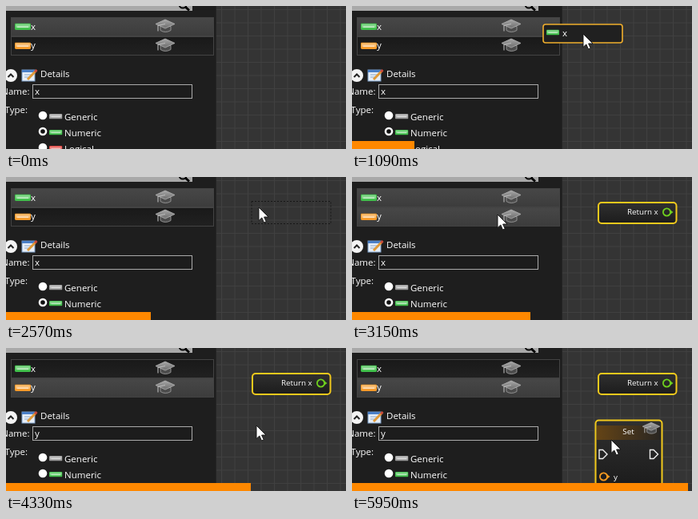
Recreate the animation shown at these times as an HTML page. Size 425 by 179 pixels, loop 6030 ms.

```html
<!DOCTYPE html>
<html lang="en">
<head>
<meta charset="utf-8">
<title>Variable drag and drop</title>
<style>
  html, body { margin: 0; height: 100%; overflow: hidden; background: #1e1e1e; }
  svg { display: block; width: 425px; height: 179px; }
  text { font: 11.5px "Open Sans", "Noto Sans", sans-serif; fill: #fff; }
  .small { font-size: 9.8px; }
  .mid { text-anchor: middle; }
  .row { fill: url(#dark); stroke: #434343; }
  .row.on { fill: url(#lit); }
  .row.focus { fill: url(#plum); stroke: #dcb51e; }
  .node { fill: url(#body); stroke: #f2c91c; stroke-width: 2; }
</style>
</head>
<body>
<svg viewBox="0 0 425 179">
  <defs>
    <linearGradient id="dark" x2="0" y2="1"><stop stop-color="#191919"/><stop offset="1" stop-color="#212121"/></linearGradient>
    <linearGradient id="lit" x2="0" y2="1"><stop stop-color="#474747"/><stop offset="1" stop-color="#3c3c3c"/></linearGradient>
    <linearGradient id="plum" x2="0" y2="1"><stop stop-color="#17151b"/><stop offset="1" stop-color="#2c2735"/></linearGradient>
    <linearGradient id="body" x2="0" y2="1"><stop stop-color="#303030"/><stop offset="1" stop-color="#1c1c1c"/></linearGradient>
    <linearGradient id="teal"><stop stop-color="#17636c"/><stop offset=".5" stop-color="#1a5058"/><stop offset="1" stop-color="#242729"/></linearGradient>
    <linearGradient id="brown"><stop stop-color="#644416"/><stop offset="1" stop-color="#282522"/></linearGradient>
    <linearGradient id="metal" x2="0" y2="1"><stop stop-color="#a8a8a8"/><stop offset="1" stop-color="#6c6c6c"/></linearGradient>
    <pattern id="grid" x="269" y="4" width="16.5" height="16.5" patternUnits="userSpaceOnUse">
      <path d="M.5 0V16.5M0 .5H16.5" stroke="#404040"/>
    </pattern>
    <symbol id="pill" viewBox="0 0 20 9" preserveAspectRatio="none">
      <rect width="20" height="9" rx="1.5" fill="currentColor"/>
      <rect x="1" y="1" width="18" height="5" rx="1" fill="#fff" opacity=".35"/>
      <path d="M3 5H17" stroke="#fff" stroke-width="1.6" opacity=".55"/>
    </symbol>
    <g id="cap">
      <path d="M-6 1V6Q0 10 7 6V1Z" fill="#4c4c4c" stroke="#999" stroke-width=".9"/>
      <path d="M-12-2 0-7.500 12-2 0 3.500Z" fill="url(#metal)" stroke="#b4b4b4" stroke-width=".8"/>
      <path d="M0-2-9 0V7" fill="none" stroke="#bbb" stroke-width="1.1"/>
    </g>
    <g id="pin" fill="none" stroke="currentColor" stroke-width="1.8">
      <circle r="4.6"/><path d="M4-3 8 0 4 3Z" fill="currentColor" stroke="none"/>
    </g>
    <path id="exec" d="M-4.5-5.5H0L5.5 0 0 5.5H-4.5Z" fill="none" stroke="#eee" stroke-width="1.4"/>
  </defs>

  <rect x="262" width="163" height="179" fill="#343434"/>
  <rect x="263" width="162" height="179" fill="url(#grid)"/>
  <path d="M262.5 0V179" stroke="#252525"/>

  <rect x="-2" y="-9.5" width="234.5" height="15" fill="#a9a9a9" stroke="#a9a9a9"/>
  <g fill="none" stroke="#050505" stroke-width="2"><circle cx="221" cy="-2" r="4.5"/><path d="M224 1 229 5.5" stroke-width="3"/></g>

  <rect id="rowX" class="row" x="6.5" y="14.5" width="253" height="23"/>
  <rect id="rowY" class="row" x="6.5" y="38.5" width="253" height="23"/>
  <use href="#pill" x="11" y="21.5" width="20" height="8.500" color="#3fbf4a"/>
  <use href="#pill" x="11" y="45.5" width="20" height="8.500" color="#f79a28"/>
  <text x="31" y="29.500">x</text>
  <text x="31" y="53">y</text>
  <use href="#cap" x="199" y="24.500"/>
  <use href="#cap" x="199" y="48.500"/>

  <circle cx="6" cy="87" r="8" fill="#f4f4f4"/>
  <path d="M2.5 89 6 85.5 9.5 89" fill="none" stroke="#222" stroke-width="2"/>
  <rect x="20" y="80" width="16" height="14" fill="#e6eef8" stroke="#7b9cc4"/>
  <path d="M20 81.5H36" stroke="#4a80c8" stroke-width="3"/>
  <path d="M23 86H32M23 89H30" stroke="#8fa9c8"/>
  <path d="M27 92 37.500 81" stroke="#e09a38" stroke-width="3"/>
  <path d="M36 82.500 38.500 80" stroke="#c94b3c" stroke-width="3"/>
  <text x="43" y="89">Details</text>
  <text x="29.500" y="111" text-anchor="end">Name:</text>
  <rect x="33.5" y="98.500" width="199" height="17" fill="#1c1c1c" stroke="#aaa"/>
  <text id="name" x="36" y="111">x</text>
  <text x="-1.500" y="134">Type:</text>
  <g id="types"></g>

  <rect id="trace" x="307" y="30.500" width="99" height="28" fill="none" stroke="#161616" stroke-dasharray="2 2"/>
  <g id="getNode">
    <rect class="node" x="308" y="32" width="97.500" height="26" rx="4"/>
    <text class="small" x="344" y="47">Return x</text>
    <use href="#pin" x="393.500" y="44" color="#6fd01e"/>
  </g>
  <g id="setNode">
    <rect class="node" x="304.500" y="90.500" width="83" height="82" rx="4"/>
    <rect x="306" y="97" width="80" height="18" fill="url(#brown)"/>
    <text class="small mid" x="345.500" y="108">Set</text>
    <use href="#cap" transform="translate(374 100) scale(.9)"/>
    <use href="#exec" x="313.500" y="133"/>
    <use href="#exec" x="377" y="133"/>
    <use href="#pin" x="314.500" y="161" color="#f59a20"/>
    <text class="small" x="327" y="165">y</text>
  </g>

  <g id="menu">
    <rect x=".5" y=".7" width="70.500" height="36" rx="4" fill="#262626" stroke="#f3e4cc" stroke-width="1.5"/>
    <rect id="pick" x="2" y="3" width="67.500" height="15" fill="url(#teal)"/>
    <text class="small mid" x="35.500" y="15">Get</text>
    <text class="small mid" x="35.500" y="31">Set</text>
  </g>
  <g id="ghost">
    <rect x="-50" y="-12" width="99" height="23" rx="3" fill="#202020" stroke="#f0ae2c" stroke-width="1.600"/>
    <use id="ghostPill" href="#pill" x="-46" y="-5.500" width="16" height="7"/>
    <text id="ghostName" x="-26" y="3"></text>
  </g>

  <rect id="bar" y="169" height="10" fill="#ff8800"/>
  <path id="cursor" d="M0 0V16.500L3.800 13 6.500 19 9.200 17.800 6.600 12H12Z" fill="#fff" stroke="#111" stroke-width=".9"/>
</svg>
<script>
const LOOP = 6030, STEP = 73.3, STEPS = 82;
const $ = id => document.getElementById(id);
const show = (id, on) => $(id).setAttribute("visibility", on ? "visible" : "hidden");
const place = (id, x, y) => $(id).setAttribute("transform", `translate(${x} ${y})`);

$("types").innerHTML = [["Generic", "#999"], ["Numeric", "#3fbf4a"], ["Logical", "#e03a34"]].map(([label, color], i) => `
  <g transform="translate(0 ${i * 20})">
    <circle cx="46" cy="137" r="5.300" fill="#fff"/>
    ${i === 1 ? '<circle id="dot" cx="46" cy="137" r="2.800" fill="#111"/>' : ""}
    <use href="#pill" x="54" y="135" width="16.500" height="6.500" color="${color}"/>
    <text x="73" y="143">${label}</text>
  </g>`).join("");

// Pointer stops: time, x, y
const path = [
  [30, 196, 190], [450, 161, 32], [560, 161, 32], [660, 163, 27], [800, 163, 27],
  [1230, 324, 37], [1390, 316, 38], [2700, 316, 38], [3240, 172, 48], [3480, 172, 48],
  [3670, 178, 71], [4040, 313, 97], [4700, 313, 97], [5000, 324, 115], [LOOP, 324, 115]
];

function pointerAt(t) {
  const i = Math.max(1, path.findIndex(p => p[0] >= t));
  const [t0, x0, y0] = path[i - 1], [t1, x1, y1] = path[i];
  const u = Math.min(1, Math.max(0, (t - t0) / (t1 - t0))), e = u * u * (3 - 2 * u);
  return [x0 + (x1 - x0) * e, y0 + (y1 - y0) * e].map(Math.round);
}

function draw(time) {
  const step = Math.min(STEPS - 1, Math.floor((time + 30) / STEP));
  const t = step * STEP;
  const within = (a, b = LOOP) => t >= a && t < b;
  const [x, y] = pointerAt(t);
  const ySelected = within(3440);
  const getMenu = within(1420, 2300), setMenu = within(4420, 5200);
  const hoverY = y > 38 && y < 62 && x < 259 && (t < 600 || t > 2700);

  $("bar").setAttribute("width", Math.round(step * 425 / STEPS));
  show("cursor", step > 0);
  place("cursor", x, y);

  $("rowX").setAttribute("class", "row" + (getMenu ? " focus" : ySelected ? "" : " on"));
  $("rowY").setAttribute("class", "row" + (setMenu ? " focus" : ySelected || hoverY ? " on" : ""));
  $("name").textContent = $("ghostName").textContent = ySelected ? "y" : "x";
  $("ghostPill").setAttribute("color", ySelected ? "#f79a28" : "#3fbf4a");
  show("dot", !ySelected);

  show("ghost", within(820, 1380) || within(3540, 4090));
  place("ghost", x, y);
  show("menu", getMenu || setMenu);
  place("menu", getMenu ? 307 : 304, getMenu ? 30 : 89);
  $("pick").setAttribute("y", setMenu && y > 107 ? 19 : 3);
  show("trace", within(2520, 2700));
  show("getNode", within(2700));
  show("setNode", within(5420));
}

function tick() {
  draw(performance.now() % LOOP);
  requestAnimationFrame(tick);
}
tick();
</script>
</body>
</html>
```
